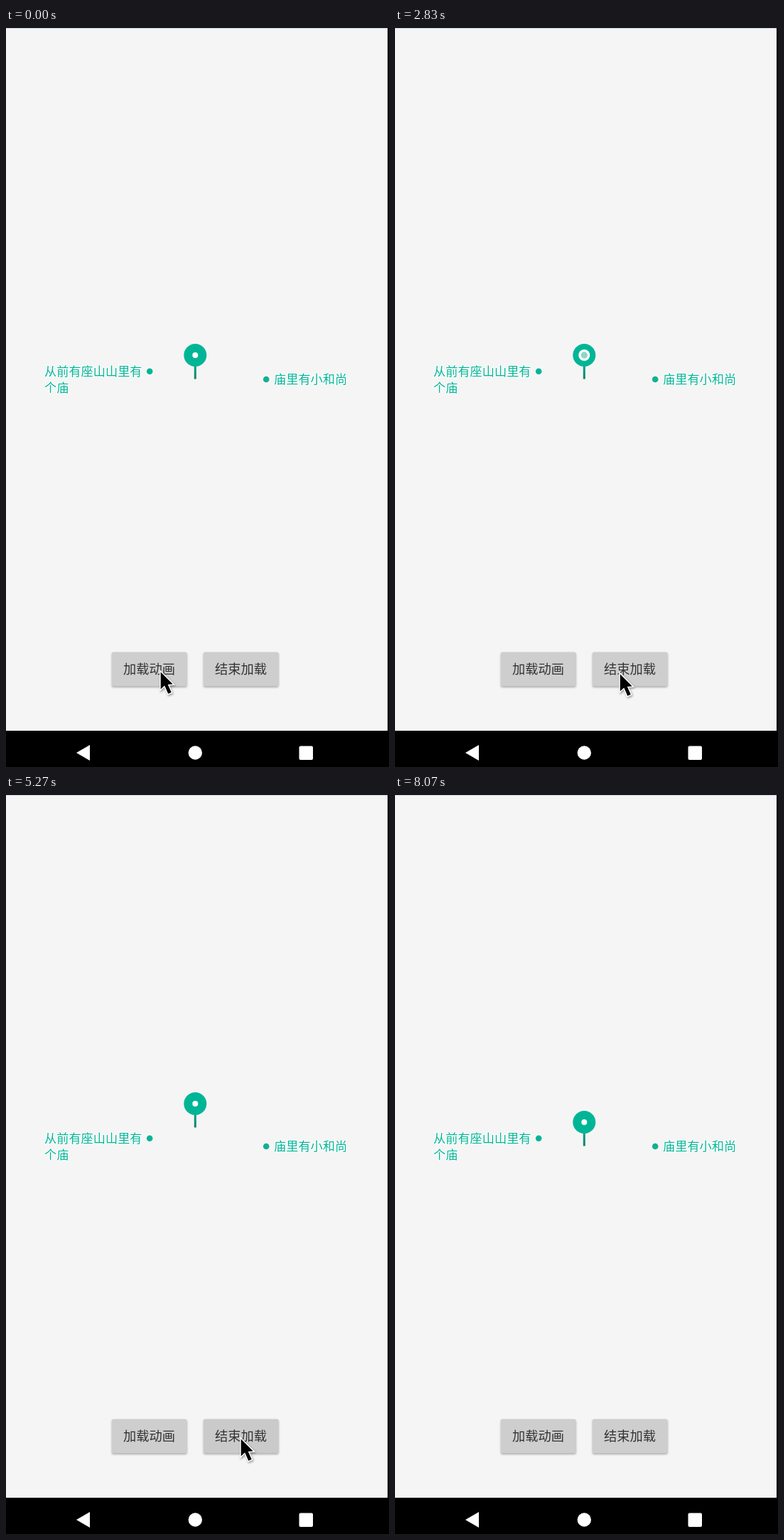
Write an HTML page with a canvas that moves like this. It is 539x1039 px and loops after 8110 ms.

```html
<!DOCTYPE html>
<html lang="zh-CN">
<head>
<meta charset="utf-8">
<style>
  html, body { margin: 0; width: 100%; height: 100%; overflow: hidden; background: #000; }
  canvas { display: block; }
</style>
</head>
<body>
<canvas id="stage" width="539" height="1039"></canvas>
<script>
const ctx = document.getElementById('stage').getContext('2d');
const LOOP = 8110;
const TEAL = '#00b596';
const FONT = '"Noto Sans CJK SC", "Noto Sans CJK", sans-serif';
const PIN = { x: 266.3, y: 460, foot: 494 };

const clamp = v => Math.min(1, Math.max(0, v));
const span = (t, start, length) => (t - start) / length;

const LOAD = { start: 1370, end: 3615, half: 600 };
const DROPS = [
  { jump: 3615, ripple: 4010 },
  { jump: 5070, ripple: 5460 }
];
const RIPPLE_TIME = 420;
const JUMP_TIME = 400;

// time, x, y of the pointer tip
const POINTER = [
  [0, 217, 905], [2250, 217, 905], [2450, 258, 909], [2650, 300, 910],
  [2830, 316, 908], [2960, 330, 905], [5950, 330, 905], [6200, 336, 926],
  [6330, 342, 942], [6400, 410, 953], [6470, 539, 951]
];

function disc(x, y, r, color) {
  ctx.fillStyle = color;
  ctx.beginPath();
  ctx.arc(x, y, r, 0, Math.PI * 2);
  ctx.fill();
}

function box(x, y, w, h, r, color) {
  ctx.fillStyle = color;
  ctx.beginPath();
  ctx.roundRect(x, y, w, h, r);
  ctx.fill();
}

function polygon(points) {
  ctx.beginPath();
  points.forEach(([x, y]) => ctx.lineTo(x, y));
  ctx.closePath();
}

function label(text, x, y) {
  ctx.font = `500 17.2px ${FONT}`;
  ctx.lineJoin = 'round';
  ctx.lineWidth = 2;
  ctx.strokeStyle = '#fff';
  ctx.strokeText(text, x, y);
  ctx.fillStyle = TEAL;
  ctx.fillText(text, x, y);
}

function pressLevel(t, times) {
  return Math.max(0, ...times.map(start => {
    const age = t - start;
    return age < 0 ? 0 : clamp(age / 60) * clamp((450 - age) / 200);
  }));
}

function button(text, x, pressed) {
  ctx.save();
  ctx.shadowColor = 'rgba(0,0,0,.32)';
  ctx.shadowBlur = 3;
  ctx.shadowOffsetY = 1.5;
  box(x, 877.5, 105.5, 48, 2, '#cecece');
  ctx.restore();
  if (pressed) box(x, 877.5, 105.5, 48, 2, `rgba(0,0,0,${0.025 * pressed})`);
  ctx.font = `400 18.3px ${FONT}`;
  ctx.fillStyle = '#333';
  ctx.fillText(text, x + 16, 908);
}

function drawScreen(t) {
  ctx.fillStyle = '#000';
  ctx.fillRect(0, 0, 539, 1039);
  ctx.fillStyle = '#f5f5f5';
  ctx.fillRect(0, 0, 537, 988);
  ctx.fillStyle = '#c9d9e6';
  ctx.fillRect(0, 0, 537, 1);

  label('从前有座山山里有', 54, 489);
  label('个庙', 54, 511.5);
  label('庙里有小和尚', 377, 500);
  disc(202.2, 482.7, 4.3, TEAL);
  disc(366.2, 494, 4.3, '#12b092');

  button('加载动画', 149, pressLevel(t, [1330]));
  button('结束加载', 278, pressLevel(t, [3515, 4970]));

  ctx.fillStyle = '#fff';
  polygon([[99, 1019], [118, 1008], [118, 1030]]);
  ctx.fill();
  disc(266.3, 1019, 9.7, '#fff');
  box(412.5, 1009.5, 19.5, 19.5, 2, '#fff');
}

function drawPin(t) {
  let lift = 0;
  for (const { jump } of DROPS) {
    const p = span(t, jump, JUMP_TIME);
    if (p > 0 && p < 1) lift = 26 * Math.sin(p * Math.PI);
  }
  ctx.save();
  ctx.translate(0, -lift);
  const shade = ctx.createLinearGradient(0, 475, 0, 493);
  shade.addColorStop(0, '#00a287');
  shade.addColorStop(1, '#14806d');
  ctx.fillStyle = shade;
  ctx.fillRect(PIN.x - 1.5, 474, 3, 19.5);
  disc(PIN.x, PIN.y, 16, TEAL);

  if (t >= LOAD.start && t < LOAD.end) {
    const phase = span(t, LOAD.start, LOAD.half);
    const swell = (1 - Math.cos(phase * Math.PI)) / 2;
    disc(PIN.x, PIN.y, 4 + 10 * swell, '#fff');
    disc(PIN.x, PIN.y, Math.min(4.7, 3 + 10 * swell), '#8fd6c6');
  } else {
    disc(PIN.x, PIN.y, 4, '#fff');
  }
  ctx.restore();
}

function drawRipples(t) {
  for (const { ripple } of DROPS) {
    const p = span(t, ripple, RIPPLE_TIME);
    if (p <= 0 || p >= 1) continue;
    const grow = 1 - (1 - p) ** 2;
    disc(PIN.x, PIN.foot, 73 * grow, `rgba(0,181,150,${0.38 * (1 - grow)})`);
  }
}

function drawPointer(t) {
  const next = POINTER.findIndex(([time]) => time > t);
  if (next < 1) return;
  const [t0, x0, y0] = POINTER[next - 1];
  const [t1, x1, y1] = POINTER[next];
  const p = span(t, t0, t1 - t0);
  ctx.save();
  ctx.translate(x0 + (x1 - x0) * p + 0.7, y0 + (y1 - y0) * p + 0.5);
  polygon([[0, 0], [0, 24], [5.5, 19], [10.5, 30.5], [15, 28.5], [10, 17.5], [17, 17]]);
  ctx.lineJoin = 'miter';
  ctx.lineWidth = 3;
  ctx.strokeStyle = '#fff';
  ctx.shadowColor = 'rgba(0,0,0,.4)';
  ctx.shadowBlur = 3;
  ctx.shadowOffsetX = 1;
  ctx.shadowOffsetY = 1.5;
  ctx.stroke();
  ctx.shadowColor = 'transparent';
  ctx.fillStyle = '#000';
  ctx.fill();
  ctx.restore();
}

const origin = performance.now();
function frame() {
  const t = (performance.now() - origin) % LOOP;
  drawScreen(t);
  drawPin(t);
  drawRipples(t);
  drawPointer(t);
  requestAnimationFrame(frame);
}
frame();
</script>
</body>
</html>
```
